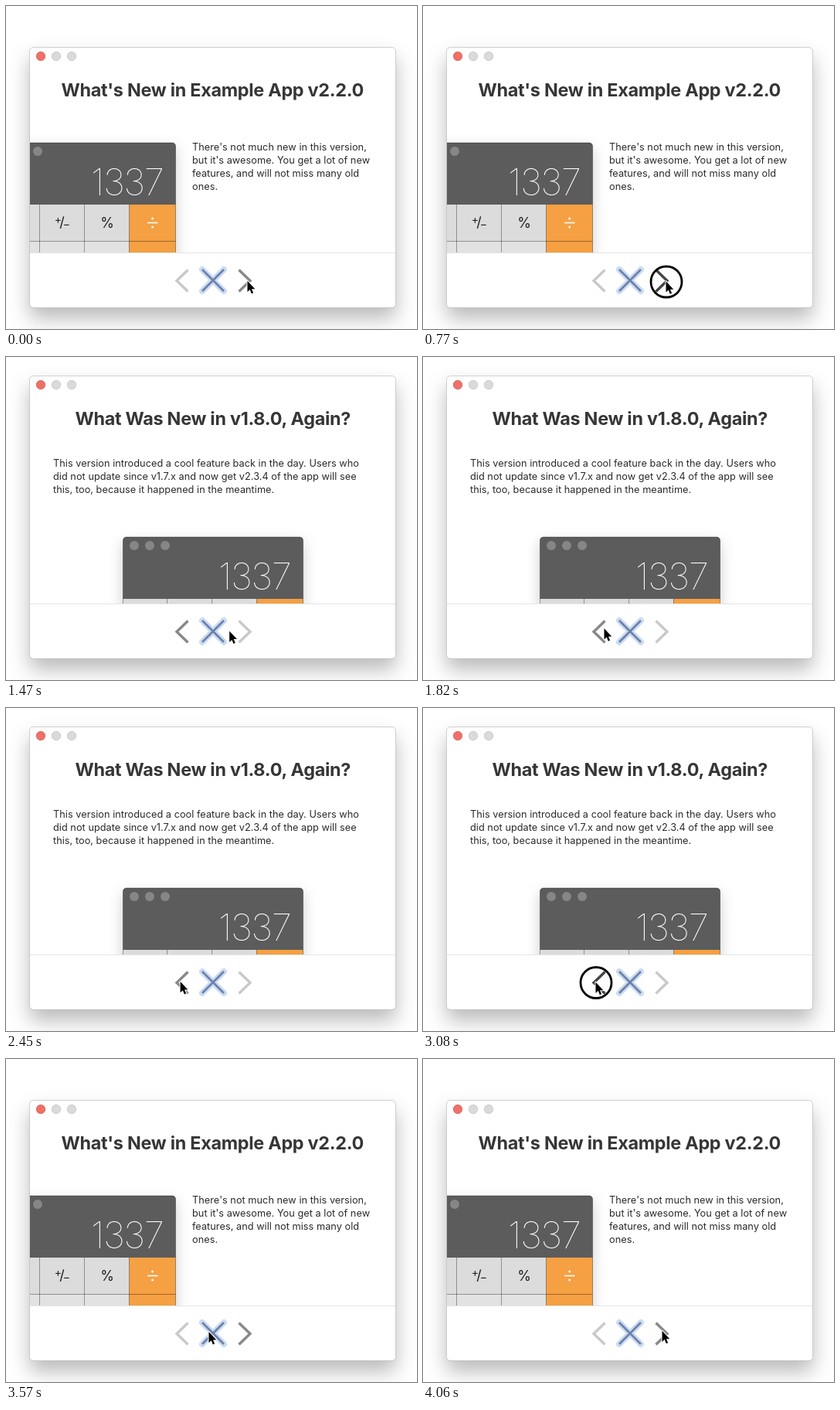
Animation, 532 px wide and 418 px high, one loop 4130 ms. Source, as an HTML page:

```html
<!DOCTYPE html>
<html lang="en">
<head>
<meta charset="utf-8">
<title>What's New</title>
<style>
  html, body { margin: 0; width: 100%; height: 100%; overflow: hidden; background: #fff; }
  svg { display: block; width: 532px; height: 418px; font-family: Inter, "Open Sans", sans-serif; font-optical-sizing: none; }
  .title { font-size: 23.4px; font-weight: 700; letter-spacing: -.28px; text-anchor: middle; fill: #363636; }
  .body { font-size: 12.75px; letter-spacing: .02px; fill: #2a2a2a; }
  .digits { font-size: 48px; font-weight: 100; letter-spacing: -1.5px; text-anchor: end; fill: #fff; }
  .key { font-size: 18px; text-anchor: middle; fill: #222; }
  .small { font-size: 14px; }
  .icon { fill: none; stroke-width: 3.4; }
</style>
</head>
<body>
<svg viewBox="0 0 532 418">
  <defs>
    <filter id="shade" filterUnits="userSpaceOnUse" x="-60" y="-40" width="660" height="540">
      <feDropShadow dx="0" dy="14" stdDeviation="13" flood-color="#000" flood-opacity=".27"/>
    </filter>
    <filter id="soft" filterUnits="userSpaceOnUse" x="-60" y="130" width="330" height="400">
      <feDropShadow dx="0" dy="7" stdDeviation="9" flood-color="#000" flood-opacity=".2"/>
    </filter>
    <clipPath id="content"><rect x="31" y="20" width="473" height="299"/></clipPath>
    <g id="lights" stroke-width=".8">
      <circle cx="45" r="5.7" fill="#ef7066" stroke="#d45f56"/>
      <circle cx="65" r="5.7" fill="#dadada" stroke="#c4c4c4"/>
      <circle cx="85" r="5.7" fill="#dadada" stroke="#c4c4c4"/>
    </g>
    <g id="calc">
      <rect x="-13.5" y="177" width="233" height="290" rx="4.5" fill="#dcdcdc" filter="url(#soft)"/>
      <path d="M-13.5 257V181.5q0-4.500 4.500-4.500H215q4.500 0 4.500 4.500V257Z" fill="#5c5c5c"/>
      <path d="M-13 305H159V340H-13Z" fill="#e2e2e2"/>
      <path d="M159.500 257H219.500V340H159.500Z" fill="#f5a043"/>
      <g fill="none" stroke="#000" stroke-opacity=".35">
        <path d="M-13.500 304.500H219.500M43.500 257V340M101.500 257V340M159.500 257V340"/>
        <rect x="-13.5" y="177" width="233" height="290" rx="4.5"/>
      </g>
      <g fill="#868686"><circle cx="1" cy="188" r="6"/><circle cx="21" cy="188" r="6"/><circle cx="41" cy="188" r="6"/></g>
      <text class="digits" x="203.500" y="245">1337</text>
      <text class="key small" x="67.500" y="281">+</text>
      <text class="key" x="72.500" y="286">/</text>
      <text class="key small" x="78.500" y="287">−</text>
      <text class="key" x="131" y="286.500">%</text>
      <path d="M183 280.500H196.500" stroke="#fff" stroke-width="1.600"/>
      <circle cx="189.700" cy="275" r="1.500" fill="#fff"/><circle cx="189.700" cy="286" r="1.500" fill="#fff"/>
    </g>
  </defs>

  <rect id="frame" x="30.500" width="474" rx="5" fill="#fff" stroke="#000" stroke-opacity=".18" filter="url(#shade)"/>
  <g id="first">
    <use href="#lights" y="65"/>
    <text class="title" x="267.300" y="117">What's New in Example App v2.2.0</text>
    <g clip-path="url(#content)"><use href="#calc"/></g>
    <g class="body" id="news"></g>
  </g>
  <g id="second">
    <use href="#lights" y="36"/>
    <text class="title" x="267.800" y="88">What Was New in v1.8.0, Again?</text>
    <g class="body" id="past"></g>
    <g clip-path="url(#content)"><use href="#calc" x="165" y="56"/></g>
  </g>
  <path d="M31 319.500H504" stroke="#e4e4e4"/>
  <path id="prev" class="icon" d="M235.500 341.500L221 355.500L235.500 369.500"/>
  <path d="M254 341L282 369M282 341L254 369" stroke="#cbdcf4" stroke-width="8" stroke-linecap="round"/>
  <path d="M254 341L282 369M282 341L254 369" stroke="#6d81a8" stroke-width="2.700"/>
  <path id="next" class="icon" d="M301.500 341.500L316 355.500L301.500 369.500"/>
  <circle id="ring" r="20" fill="none" stroke="#000" stroke-width="2.800"/>
  <path id="cursor" d="M.5 .8v14.200l3.200-2.900l2.100 5.100l2.300-1l-2.100-5h4.300z" fill="#000" stroke="#fff" stroke-width="2" stroke-linejoin="round" paint-order="stroke"/>
</svg>
<script>
const LOOP = 4130, TICK = 70;
const $ = id => document.getElementById(id);
const set = (id, attrs) => {
  for (const name in attrs) $(id).setAttribute(name, attrs[name]);
};

function paragraph(id, x, y, lines) {
  lines.forEach((line, i) => {
    const text = document.createElementNS($(id).namespaceURI, "text");
    text.setAttribute("x", x);
    text.setAttribute("y", y + i * 17);
    text.textContent = line;
    $(id).append(text);
  });
}
paragraph("news", 241, 187, [
  "There's not much new in this version,",
  "but it's awesome. You get a lot of new",
  "features, and will not miss many old",
  "ones."
]);
paragraph("past", 61, 142, [
  "This version introduced a cool feature back in the day. Users who",
  "did not update since v1.7.x and now get v2.3.4 of the app will see",
  "this, too, because it happened in the meantime."
]);

// Each move: first tick in ms, number of ticks, end point
const START = [312, 355];
const MOVES = [
  [70, 2, 312.5, 355.5],
  [420, 2, 314, 355.5],
  [1330, 8, 234, 350.5],
  [2100, 1, 229, 352],
  [2310, 5, 223, 354],
  [3360, 8, 301, 350.5],
  [4060, 1, 309, 351]
];
const ease = k => k * k * (3 - 2 * k);

function pointer(t) {
  let [x, y] = START;
  for (const [from, ticks, toX, toY] of MOVES) {
    const steps = (t - from) / TICK + 1;
    const k = ease(Math.max(0, Math.min(1, steps / ticks)));
    x += (toX - x) * k;
    y += (toY - y) * k;
  }
  return [x, y];
}

function draw(ms) {
  const t = Math.floor((ms % LOOP + 0.01) / TICK) * TICK;
  const second = t >= 910 && t < 3150;
  const pressNext = t >= 770 && t < 910;
  const pressPrev = t >= 3080 && t < 3150;
  const color = (on, pressed) => pressed ? "#454545" : on ? "#888" : "#c9c9c9";
  const top = second ? 24.5 : 53.5;
  const [x, y] = pointer(t);

  set("frame", { y: top, height: 390.5 - top });
  set("first", { display: second ? "none" : "inline" });
  set("second", { display: second ? "inline" : "none" });
  set("prev", { stroke: color(second, pressPrev) });
  set("next", { stroke: color(!second, pressNext) });
  set("ring", {
    cx: x + 1, cy: y + 1.5,
    display: pressNext || pressPrev ? "inline" : "none"
  });
  set("cursor", { transform: `translate(${x} ${y})` });
}

const begin = performance.now();
function loop() {
  draw(performance.now() - begin);
  requestAnimationFrame(loop);
}
draw(0);
requestAnimationFrame(loop);
</script>
</body>
</html>
```
